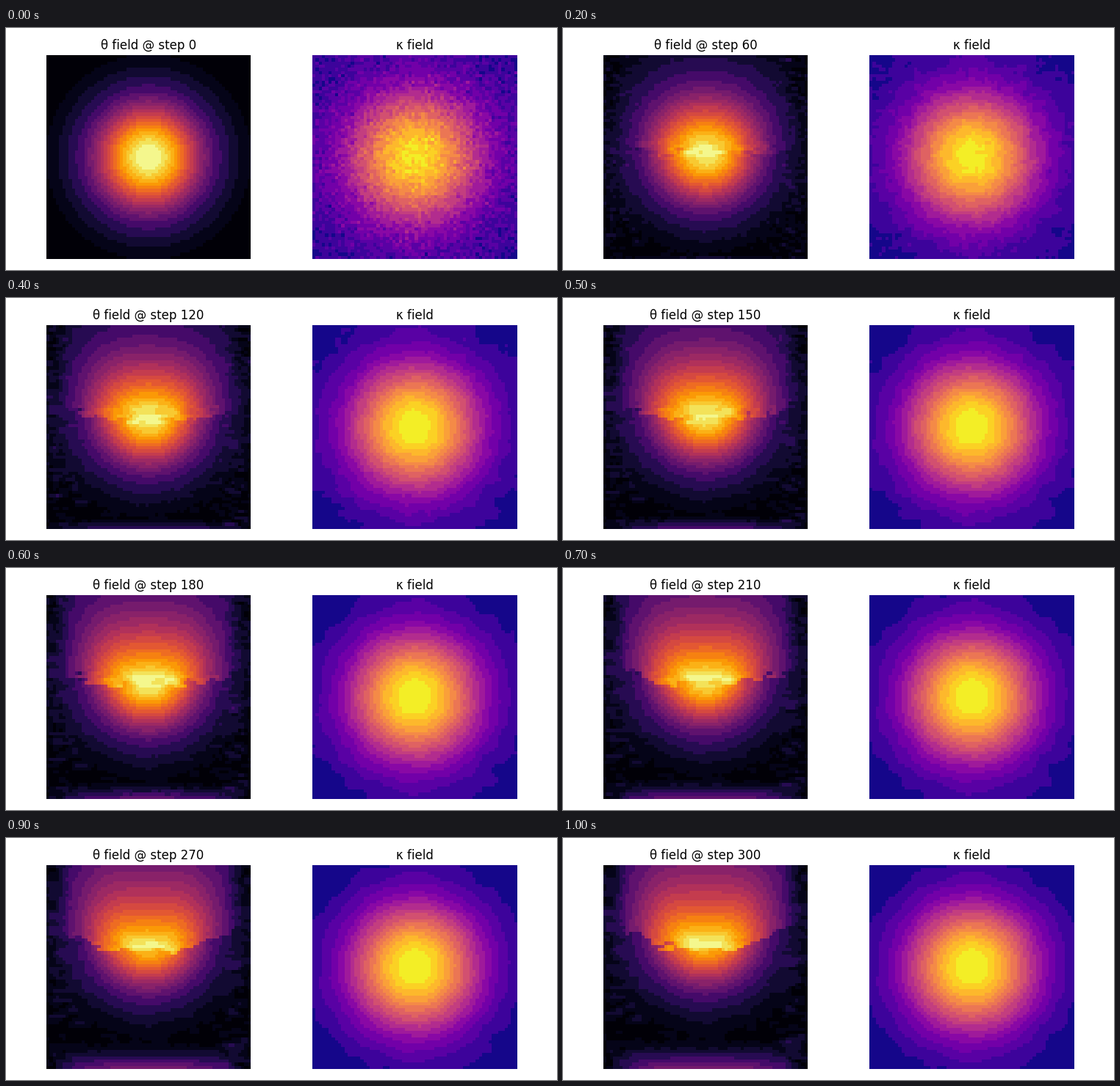
These frames come from a looping animation (750x330 px, 1100 ms). A matplotlib script:

```python
import numpy as np
import matplotlib.pyplot as plt
from matplotlib.animation import FuncAnimation

N = 64
FRAMES = 11
STEP = 30
W, H, DPI = 750, 330, 100

axis = (np.arange(N) + 0.5) / N * 2 - 1
X, Y = np.meshgrid(axis, axis)

rng = np.random.default_rng(7)
grain = rng.normal(size=(N, N))
ridge = rng.normal(size=(N, N))
kappa_noise = rng.normal(size=(N, N))

THETA_EDGES = np.r_[0, 0.028, 0.062, 0.11, 0.175, 0.24, np.arange(0.3, 1.01, 0.05)]
KAPPA_EDGES = np.linspace(0, 1, 17)


def smoothstep(a, b, v):
    t = np.clip((v - a) / (b - a), 0, 1)
    return t * t * (3 - 2 * t)


def diffuse(a, dx, dy, steps):
    for _ in range(steps):
        a = (a + dx * (np.roll(a, 1, 1) + np.roll(a, -1, 1) - 2 * a)
             + dy * (np.roll(a, 1, 0) + np.roll(a, -1, 0) - 2 * a))
    return a


def banded(a, edges):
    """Scale to 0..1 and flatten into bands."""
    a = (a - a.min()) / (a.max() - a.min())
    mids = (edges[:-1] + edges[1:]) / 2
    mids[0], mids[-1] = 0.012, 0.975
    k = np.clip(np.digitize(a, edges) - 1, 0, len(mids) - 1)
    return mids[k]


def dome(y, p):
    """Rising part: a Gaussian that stretches into a broad dome."""
    s = np.abs(y + 0.24 * p)
    q = 1 - (1 - p) ** 2
    start = 3.5 * (X**2 + s**2)
    end = np.hypot(2.15 * X**2, 1.38 * s)
    return np.exp(-start ** (1 - q) * end**q)


def theta(i):
    p = i / (FRAMES - 1)
    bowl = np.exp(-3.5 * (X**2 + (Y + 0.37 * p) ** 2))
    if i == 0:
        return bowl
    side = smoothstep(0.72, 0.95, np.abs(X))
    upper = dome(Y, p) * (1 - side) + bowl * side

    # ragged front between the dome and the bowl
    rough = diffuse(ridge, 0.2, 0.05, 2 + i // 3)
    rough /= rough.std()
    front = p * (-0.17 - 0.3 * X**2)
    field = np.where(Y < front + 0.025 * rough, upper, bowl)
    near = np.exp(-((Y - front + 0.03) / 0.09) ** 2)
    field = field + 0.035 * (1 - 0.5 * p) * near * rough * (np.abs(X) < 0.7)

    # the top flows back in at the bottom
    wrap = dome(-np.ones_like(Y), p) * np.exp(-((1 - Y) / (0.14 * p)) ** 1.5)
    field = np.maximum(field, wrap * (1 - side))

    speckle = np.roll(diffuse(grain, 0.16, 0.07, i), -int(round(12 * p)), 0)
    speckle = np.abs(speckle / speckle.std())
    weight = 0.25 + 0.75 * smoothstep(0.5, 0.88, np.abs(X))
    amount = 0.045 * min(1, 0.35 + 2.5 * p)
    field = field + amount * weight * speckle * np.clip(1 - 3 * field, 0, 1)
    return np.clip(field, 0, None)


def kappa(i):
    bump = np.exp(-2.5 * (X**2 + Y**2))
    return bump + diffuse(0.042 * kappa_noise, 0.006, 0.006, STEP * i)


thetas = [banded(theta(i), THETA_EDGES) for i in range(FRAMES)]
kappas = [banded(kappa(i), KAPPA_EDGES) for i in range(FRAMES)]

plt.rcParams["font.family"] = "DejaVu Sans"
fig = plt.figure(figsize=(W / DPI, H / DPI), dpi=DPI, facecolor="white")


def panel(left, data, cmap, title):
    ax = fig.add_axes([left / W, 15 / H, 278 / W, 278 / H])
    ax.set_axis_off()
    img = ax.imshow(data, cmap=cmap, vmin=0, vmax=1,
                    interpolation="nearest", aspect="auto")
    return img, ax.set_title(title, fontsize=12)


theta_img, theta_title = panel(55, thetas[0], "inferno", "θ field @ step 0")
kappa_img, _ = panel(417, kappas[0], "plasma", "κ field")


def update(i):
    theta_img.set_data(thetas[i])
    kappa_img.set_data(kappas[i])
    theta_title.set_text(f"θ field @ step {i * STEP}")
    return theta_img, kappa_img, theta_title


anim = FuncAnimation(fig, update, frames=FRAMES, interval=100,
                     repeat=True, repeat_delay=0)
plt.show()
```
